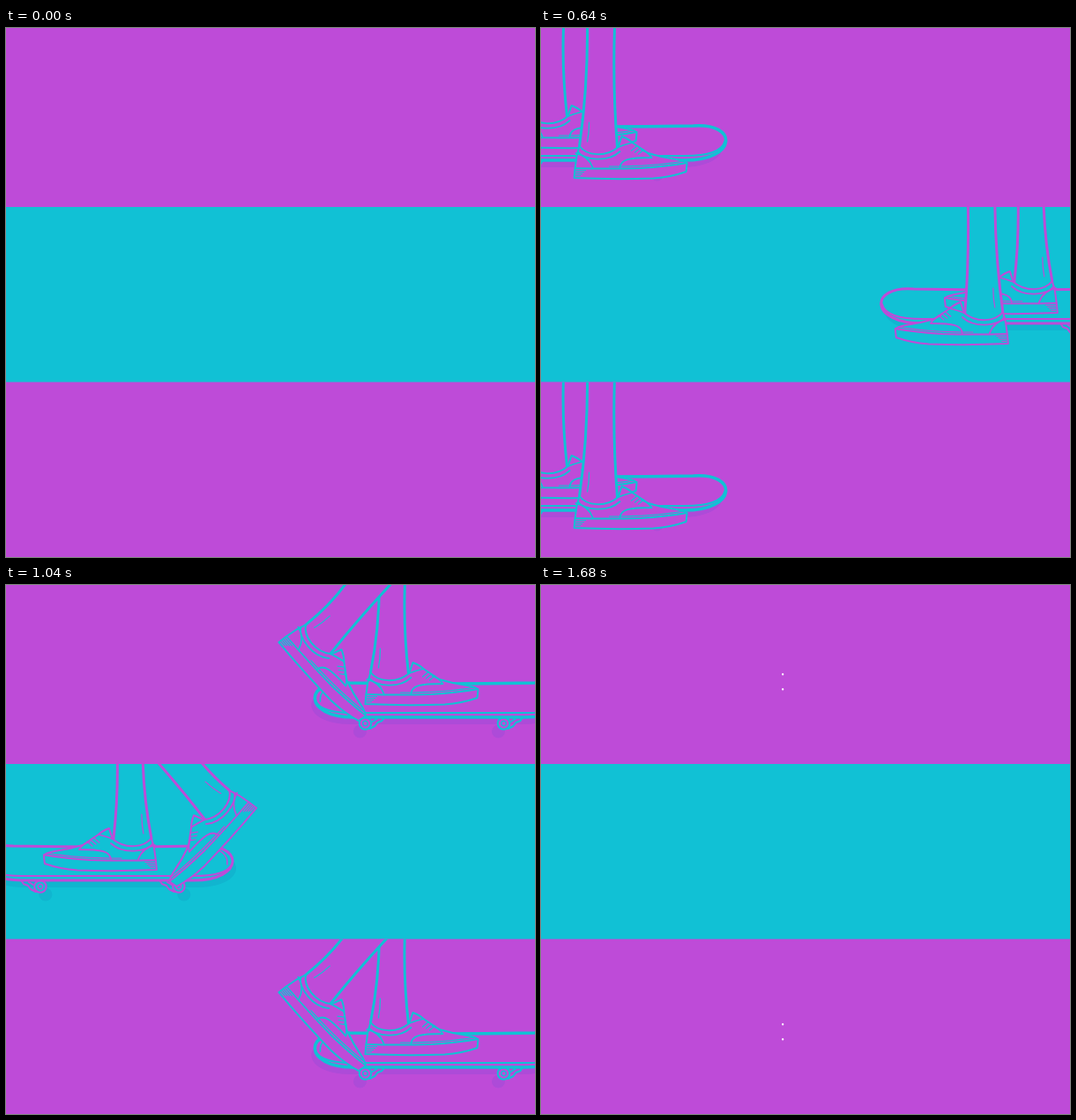
An HTML page with a canvas that plays this animation: 600x600 px, repeating every 1760 ms.

```html
<!DOCTYPE html>
<html lang="en">
<head>
<meta charset="utf-8">
<title>Skaters</title>
<style>
  html, body { margin: 0; width: 100%; height: 100%; overflow: hidden; background: #be4bd8; }
  canvas { display: block; }
</style>
</head>
<body>
<canvas id="stage" width="600" height="600"></canvas>
<script>
const ctx = document.getElementById('stage').getContext('2d');
const LOOP = 1760, STEP = 80, START = 160;
const BOARD_LENGTH = 287;

const purple = { fill: '#be4bd8', line: '#11c1d5', shadow: '#ad4bd8' };
const cyan = { fill: '#11c1d5', line: '#be4bd8', shadow: '#11b5cf', mirrored: true };
const bands = [
  { ...purple, top: 0, bottom: 203, offset: 0 },
  { ...cyan, top: 203, bottom: 401.8, offset: 185 },
  { ...purple, top: 401.8, bottom: 600, offset: 397 }
];

const repeat = (count, draw) => Array.from({ length: count }, (_, i) => draw(i)).join('');

// Shoe: the origin is the bottom of the heel, the toe points right.
const shoe = {
  outline: new Path2D('M1 -12Q2 -25 6 -37C14 -26 36 -24 50 -36L54 -48Q62 -45 66 -41L84 -29' +
    'Q100 -24 116 -22Q127 -20 128 -17L127 -8Q110 -2 90 -.5Q45 1 0 -1Z'),
  seams: new Path2D('M1 -12Q40 -11 75 -12Q105 -14 128 -18M4 -31C12 -21 38 -18 52 -31' +
    'M50 -36Q58 -39 66 -41M52 -13C53 -22 62 -24 88 -24Q84 -30 76 -33M2 -29Q16 -26 21 -13'),
  details: new Path2D('M40 -14Q90 -14 124 -20M17 -64Q17 -52 15 -42' +
    repeat(4, i => `M2 ${2 * i - 9.5}h${11 - 2 * i}`) +
    repeat(3, i => `M${65 + 4 * i} ${2 * i - 32}l6 -5`))
};

// Board: the origin is the tail, the nose points right.
const board = {
  outline: new Path2D('M40 111Q140 113 250 111C301 107 301 150 240 150H45C-13 150 -13 107 40 111Z'),
  edge: new Path2D('M2 132C6 141 22 145 45 145H240C268 145 283 140 286 128'),
  shine: new Path2D('M7 132C6 121 14 115 26 114'),
  truck: new Path2D('M5 163L11 160L14 156L19 154L21 151M8 155L13 152')
};

const noseAt = n => 438 + 506 * Math.tanh((n - 8.7) / 5.55);

// Leg positions are relative to the nose; "back" and "front" are the leg's edges at the top.
const standing = { x: -229, y: 136, angle: 0, back: -213, front: -184, lead: 29 };

function pushing(n) {
  const phase = (n - 10) / (n < 10 ? 4 : 4.5);
  const kick = Math.abs(phase) < 1 ? (1 + Math.cos(Math.PI * phase)) / 2 : 0;
  const lift = kick ** 1.5;
  return {
    x: -172 - 181 * kick ** 0.75 + 9 * Math.max(0, n - 10),
    y: 171 - 127 * lift,
    angle: kick * 54 * Math.PI / 180,
    back: -157 - 112 * lift,
    front: -126 - 87 * lift,
    lead: 28 - 16 * kick
  };
}

function stroke(path, width) {
  ctx.lineWidth = width;
  ctx.stroke(path);
}

function circle(x, y, r) {
  const path = new Path2D();
  path.arc(x, y, r, 0, Math.PI * 2);
  return path;
}

function drawBoard(band) {
  const wheels = [58, 215].map(x => x + (band.mirrored ? 4 : 0));
  ctx.save();
  ctx.translate(-BOARD_LENGTH, 0);

  ctx.fillStyle = band.shadow;
  ctx.save();
  ctx.translate(-4, 8);
  ctx.fill(board.outline);
  ctx.restore();
  wheels.forEach(x => ctx.fill(circle(x - 6, 166, 7.5)));

  ctx.fillStyle = band.fill;
  for (const x of wheels) {
    ctx.save();
    ctx.translate(x, 0);
    const wheel = circle(0, 157, 6.8);
    stroke(board.truck, 2);
    ctx.fill(wheel);
    stroke(wheel, 2);
    stroke(circle(0, 157, 2.8), 1.4);
    ctx.restore();
  }
  ctx.fill(board.outline);
  stroke(board.outline, band.mirrored ? 3 : 3.6);
  stroke(board.edge, 2);
  stroke(board.shine, 1.6);
  ctx.restore();
}

function drawLeg(band, pose) {
  const lead = band.mirrored ? pose.lead : 0;
  const x = pose.x + lead, y = pose.y + (band.mirrored ? 3 : 0);
  const c = Math.cos(pose.angle), s = Math.sin(pose.angle);
  const place = (px, py) => [x + px * c - py * s, y + px * s + py * c];
  const heel = place(6, -37), ankle = place(26, -20), instep = place(49, -36);
  const bend = (top, end, bulge) => `Q${(top + end[0]) / 2 + bulge} ${end[1] / 2} `;
  const back = pose.back + lead, front = pose.front + lead;
  const backSide = `M${back} -3${bend(back, heel, 5)}${heel}`;
  const frontBend = bend(front, instep, -4);

  ctx.fillStyle = band.fill;
  ctx.fill(new Path2D(`${backSide}L${ankle}L${instep}${frontBend}${front} -3Z`));
  stroke(new Path2D(`${backSide}M${front} -3${frontBend}${instep}`), 3);

  ctx.save();
  ctx.translate(x, y);
  ctx.rotate(pose.angle);
  ctx.fill(shoe.outline);
  stroke(shoe.outline, 2);
  stroke(shoe.seams, 1.8);
  stroke(shoe.details, 1.2);
  ctx.restore();
}

// White streaks left behind: the head runs evenly, the tail catches up.
function drawStreaks(band, n) {
  const dir = band.mirrored ? 1 : -1;
  const [x, y, gap, start] = band.mirrored ? [269, 128, 7.5, 11] : [378, 101, 10, 12];
  ctx.strokeStyle = '#fff';
  for (let i = 0; i < 3; i++) {
    const odd = i % 2;
    const u = (n - start) / (7.1 - 0.4 * odd);
    if (u <= 0 || u >= 1) continue;
    const from = x + dir * 29 * odd, travel = dir * (106 - 32 * odd);
    const inset = dir * Math.min(1.5, Math.abs(travel) * (u - u * u) / 2);
    const py = band.offset + y + gap * i * (1 - 0.15 * u);
    ctx.lineWidth = 1.6 + (2.4 - odd) * Math.sqrt(Math.sin(Math.PI * u));
    ctx.beginPath();
    ctx.moveTo(from + travel * u * u + inset, py);
    ctx.lineTo(from + travel * u - inset, py + 0.5);
    ctx.stroke();
  }
}

function drawBand(band, n) {
  ctx.save();
  ctx.beginPath();
  ctx.rect(0, band.top, 600, band.bottom - band.top);
  ctx.clip();
  ctx.fillStyle = band.fill;
  ctx.fillRect(0, band.top, 600, band.bottom - band.top);
  if (n >= 0) {
    const nose = noseAt(n);
    ctx.save();
    if (band.mirrored) {
      ctx.translate(226 - (nose - 374) * 0.972, band.offset);
      ctx.scale(-1, 1);
    } else {
      ctx.translate(nose, band.offset);
    }
    ctx.strokeStyle = band.line;
    drawBoard(band);
    drawLeg(band, standing);
    drawLeg(band, pushing(n));
    ctx.restore();
    drawStreaks(band, n);
  }
  ctx.restore();
}

function render() {
  const n = Math.floor((performance.now() % LOOP - START) / STEP);
  ctx.lineCap = ctx.lineJoin = 'round';
  ctx.fillStyle = purple.fill;
  ctx.fillRect(0, 0, 600, 600);
  bands.forEach(band => drawBand(band, n));
  requestAnimationFrame(render);
}
render();
</script>
</body>
</html>
```
